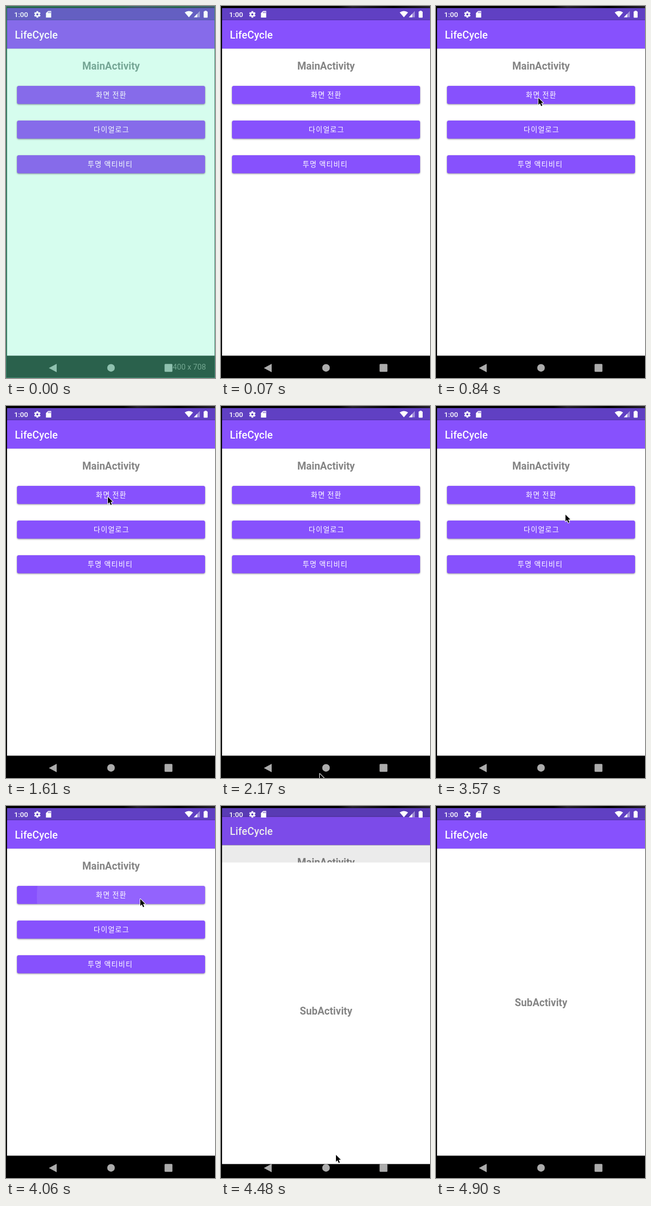
An HTML page with a canvas for the animation above (5.18 s loop, 400x708 px).

```html
<!DOCTYPE html>
<html lang="ko">
<head>
<meta charset="utf-8">
<title>LifeCycle</title>
<style>
html, body { margin: 0; width: 100%; height: 100%; overflow: hidden; background: #000; }
canvas { display: block; width: 400px; height: 708px; }
</style>
</head>
<body>
<canvas id="stage"></canvas>
<script>
const LOOP = 5180, STEP = 70, W = 400, H = 708;
const canvas = document.getElementById('stage');
const ratio = window.devicePixelRatio || 1;
canvas.width = W * ratio;
canvas.height = H * ratio;
const c = canvas.getContext('2d');
c.scale(ratio, ratio);

const LATIN = 'Roboto, sans-serif';
const KOREAN = '"Noto Sans CJK KR", "Noto Sans CJK", sans-serif';

const plain = {
  edge: '#000', glow: '#27222d', status: '#6040c3', bar: '#8751fd', page: '#fff',
  title: '#858585', button: '#8751fd', nav: '#acacac', text: '#fff', shade: 'rgba(40,20,90,.45)'
};
const tinted = {
  edge: '#2a614c', glow: '#4b4a75', status: '#645fc2', bar: '#866bea', page: '#d6fdee',
  title: '#76a796', button: '#866bea', nav: '#8fc1af', text: '#f4fffb', shade: 'rgba(40,80,110,.45)'
};

// Cursor tip: time, x, y
const trips = [
  [[210, 188, 708], [560, 204, 235], [770, 196, 175], [1400, 195, 173], [1610, 195, 173],
   [2100, 190, 676], [2170, 189, 700], [2240, 189, 712]],
  [[2590, 186, 707], [2870, 187, 701], [3080, 198, 668], [3640, 250, 186], [3850, 257, 177],
   [4130, 257, 177], [4200, 254, 215], [4480, 220, 664], [4760, 216, 690], [4830, 215, 702],
   [4900, 215, 712]]
];
const buttons = [['화면 전환', 152, 201.5], ['다이얼로그', 218, 202], ['투명 액티비티', 284, 199.5]];
const PRESS = 3990, SLIDE = 4340, SLIDE_TIME = 425;

const clamp = v => Math.max(0, Math.min(1, v));
const smooth = v => v * v * (3 - 2 * v);

function rect(color, x, y, w, h) {
  c.fillStyle = color;
  c.fillRect(x, y, w, h);
}

function shape(color, ...points) {
  c.fillStyle = color;
  c.beginPath();
  points.forEach(([x, y]) => c.lineTo(x, y));
  c.closePath();
  c.fill();
}

function disc(color, x, y, r) {
  c.fillStyle = color;
  c.beginPath();
  c.arc(x, y, r, 0, 7);
  c.fill();
}

function rounded(x, y, w, h, r) {
  c.beginPath();
  c.roundRect(x, y, w, h, r);
}

function text(str, x, y, font, color, align = 'left', spacing = 0) {
  c.font = font;
  c.fillStyle = color;
  c.textAlign = align;
  c.letterSpacing = spacing + 'px';
  c.fillText(str, x, y);
}

function header(p) {
  rect(p.page, 2, 81, 398, 584.5);
  rect(p.status, 2, 4, 398, 23);
  rect(p.bar, 2, 27, 398, 54);
  rect(p.shade, 2, 26.3, 398, 0.7);
  rect('rgba(60,40,110,.15)', 2, 81, 398, 1);
  text('LifeCycle', 17, 62, '500 19.6px ' + LATIN, p.text, 'left', 0.15);
}

function ripple(y, t) {
  const k = clamp((t - PRESS) / 140);
  const fade = 1 - clamp((t - 4200) / 280);
  if (t < PRESS || fade === 0) return;
  c.save();
  rounded(21, y, 360, 34.5, 3.5);
  c.clip();
  c.globalAlpha = 0.1 * fade;
  disc('#fff', 257 - 56 * k, y + 20, 40 + 260 * k);
  c.restore();
}

function mainPage(p, t) {
  header(p);
  text('MainActivity', 201, 121, '700 19.5px ' + LATIN, p.title, 'center');
  buttons.forEach(([label, y, x], i) => {
    c.save();
    c.shadowColor = 'rgba(0,0,0,.4)';
    c.shadowBlur = 3 * ratio;
    c.shadowOffsetY = ratio;
    c.fillStyle = p.button;
    rounded(21, y, 360, 34.5, 3.5);
    c.fill();
    c.restore();
    if (i === 0) ripple(y, t);
    text(label, x, y + 22, '400 13.6px ' + KOREAN, p.text, 'center', 1.2);
  });
}

function subPage(p) {
  header(p);
  text('SubActivity', 201, 381, '700 19.5px ' + LATIN, p.title, 'center');
}

function gear(x, y, color, hole) {
  c.save();
  c.translate(x, y);
  for (let i = 0; i < 6; i++) {
    c.rotate(Math.PI / 3);
    rect(color, -1.7, -6.2, 3.4, 4);
  }
  disc(color, 0, 0, 4.6);
  disc(hole, 0, 0, 2.1);
  c.restore();
}

function statusIcons(p) {
  const ink = p.text;
  text('1:00', 15.5, 21, '500 13.6px ' + LATIN, ink);
  gear(60, 16, ink, p.status);
  shape(ink, [80.5, 9.5], [86.5, 9.5], [86.5, 22], [76.5, 22], [76.5, 13.5]);
  [80.5, 82.5, 84.5].forEach(x => rect(p.status, x, 11, 1, 2.5));
  c.fillStyle = ink;
  c.beginPath();
  c.moveTo(350, 21.5);
  c.lineTo(342, 12.2);
  c.quadraticCurveTo(350, 6.8, 358, 12.2);
  c.fill();
  c.globalAlpha = 0.4;
  shape(ink, [371, 9.5], [371, 21.5], [359.5, 21.5]);
  c.globalAlpha = 1;
  shape(ink, [366, 14.7], [366, 21.5], [359.5, 21.5]);
  rect(ink, 380.3, 9, 3.6, 2);
  c.fillStyle = ink;
  rounded(378.3, 10.2, 7.6, 12, 1);
  c.fill();
}

function navIcons(p) {
  shape(p.nav, [82, 689], [97, 681], [97, 697]);
  disc(p.nav, 201, 688.7, 7.2);
  c.fillStyle = p.nav;
  rounded(303.5, 681.3, 15, 15, 1.5);
  c.fill();
}

function topEdge(p) {
  const g = c.createLinearGradient(225, 0, 400, 0);
  g.addColorStop(0, p.edge);
  g.addColorStop(0.15, p.glow);
  g.addColorStop(0.6, p.edge);
  g.addColorStop(1, p.glow);
  rect(p.edge, 0, 0, W, 4);
  rect(g, 225, 0, 175, 3.5);
}

function cursor(t) {
  const trip = trips.find(k => t >= k[0][0] && t < k[k.length - 1][0]);
  if (!trip) return;
  const i = trip.findIndex(k => k[0] > t);
  const a = trip[i - 1], b = trip[i];
  const k = smooth((t - a[0]) / (b[0] - a[0]));
  c.save();
  c.translate(a[1] + (b[1] - a[1]) * k, a[2] + (b[2] - a[2]) * k);
  c.lineJoin = 'round';
  c.lineWidth = 2;
  c.strokeStyle = '#fff';
  c.beginPath();
  [[0, 0], [0, 13], [3, 10.3], [5.3, 15.5], [7.5, 14.5], [5.3, 9.5], [9.3, 9.3]]
    .forEach(([x, y]) => c.lineTo(x, y));
  c.closePath();
  c.stroke();
  c.fillStyle = '#000';
  c.fill();
  c.restore();
}

function draw(t) {
  const p = t < STEP ? tinted : plain;
  const k = clamp((t - SLIDE) / SLIDE_TIME);
  const move = 1 - Math.pow(1 - k, 1.5);
  const reveal = 1 - Math.pow(1 - k, 4.7);
  rect(p.edge, 0, 0, W, H);

  c.save();
  c.beginPath();
  c.rect(2, 4, 398, 704);
  c.clip();
  if (k < 1) {
    c.save();
    c.translate(0, -15 * move);
    mainPage(p, t);
    c.restore();
    rect(`rgba(0,0,0,${0.08 * clamp(k * 3)})`, 2, 4, 398, 704);
  }
  if (k > 0) {
    c.beginPath();
    c.rect(2, 4 + 677 * (1 - reveal), 398, 704);
    c.clip();
    c.translate(0, 29 * (1 - move));
    subPage(p);
  }
  c.restore();

  topEdge(p);
  statusIcons(p);
  navIcons(p);
  if (p === tinted) {
    text('400 x 708', 319, 692, '400 14.6px ' + LATIN, '#74a892');
    c.strokeStyle = '#3f8a70';
    c.lineWidth = 1;
    c.strokeRect(0.5, 0.5, W - 1, H - 1);
  }
  cursor(t);
}

const start = performance.now();
function tick() {
  const t = (performance.now() - start) % LOOP;
  draw(Math.floor(t / STEP) * STEP);
  requestAnimationFrame(tick);
}
tick();
</script>
</body>
</html>
```
